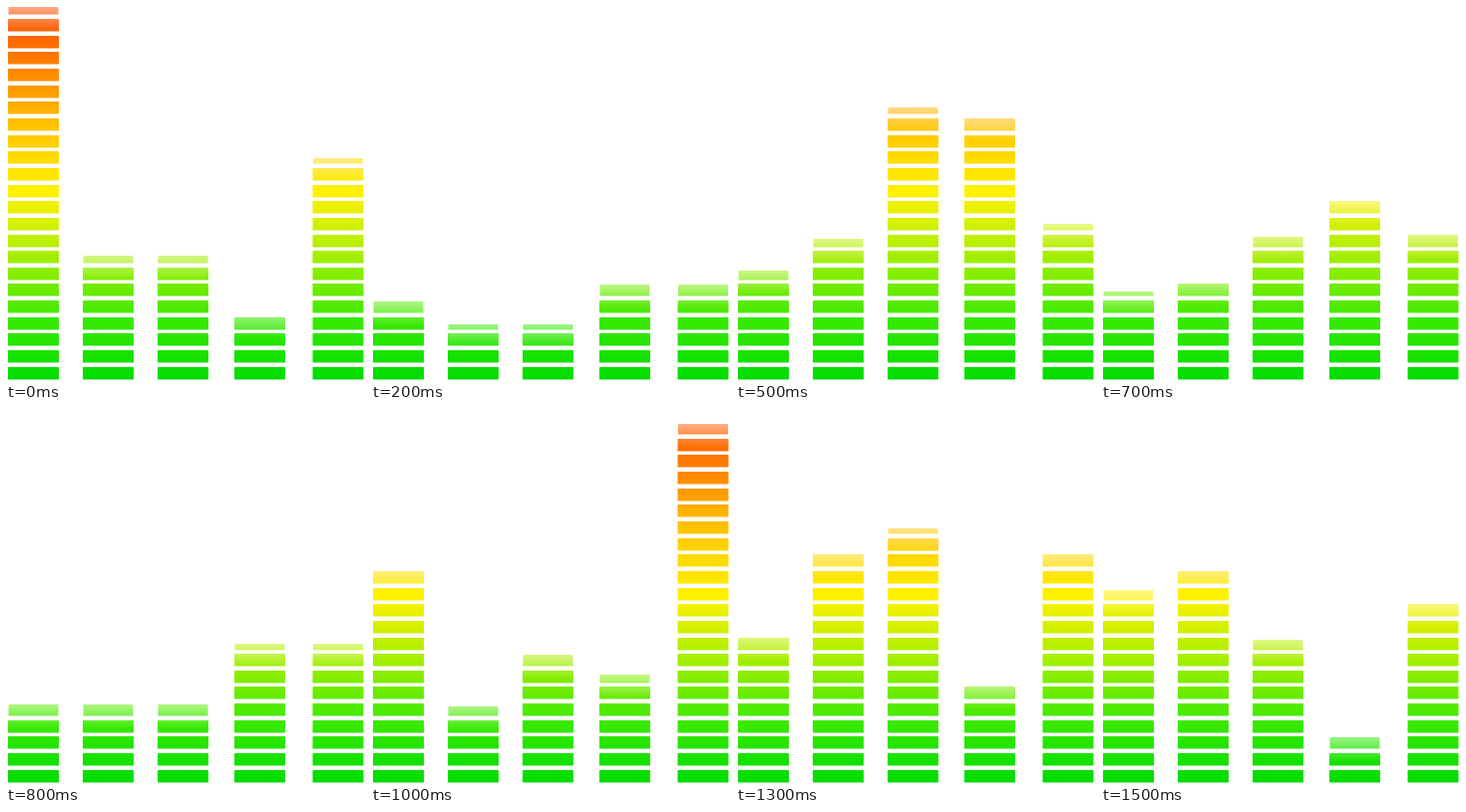
An HTML page with a canvas that plays this animation: 360 px wide and 377 px high, repeating every 1600 ms.

```html
<!DOCTYPE html>
<html lang="en">
<head>
<meta charset="utf-8">
<title>Equalizer</title>
<style>
  html, body { margin: 0; width: 100%; height: 100%; overflow: hidden; background: #fff; }
  canvas { display: block; }
</style>
</head>
<body>
<canvas id="stage" width="360" height="377"></canvas>
<script>
const W = 360, H = 377, STEP = 100, STEPS = 16;
const BAR_W = 51, SEG_H = 12.6, PITCH = 16.65, BASE = 362.7, FADE = 25;
const BARS = [2, 77, 152, 229, 307.5];

// Key poses: the top edge of each bar at a step
const POSES = [
  { step: 0, tops: [1, 251, 251, 309, 153] },
  { step: 2, tops: [297, 320, 320, 280, 280] },
  { step: 5, tops: [266, 234, 102, 112, 219] },
  { step: 8, tops: [297, 297, 297, 236, 236] },
  { step: 10, tops: [160, 299, 247, 267, 15] },
  { step: 12, tops: [251, 137, 64, 251, 120] },
  { step: 15, tops: [182, 160, 232, 330, 194] }
];

// Evenly spaced from the top of the stage to the bottom
const COLORS = ['#ff4800', '#ff8400', '#ffc800', '#fff200', '#a6ee00', '#3cea00', '#00dc00'];

const ctx = document.getElementById('stage').getContext('2d');

function gradient(y0, y1, colors) {
  const g = ctx.createLinearGradient(0, y0, 0, y1);
  colors.forEach((color, i) => g.addColorStop(i / (colors.length - 1), color));
  return g;
}

const ramp = gradient(0, H - 1, COLORS);

function topsAt(step) {
  const i = POSES.findLastIndex(pose => pose.step <= step);
  const a = POSES[i], b = POSES[i + 1] || a;
  const k = (step - a.step) / (b.step - a.step || 1);
  return a.tops.map((top, n) => Math.round(top + (b.tops[n] - top) * k));
}

function drawBar(x, top) {
  ctx.beginPath();
  for (let y = BASE; Math.round(y) + SEG_H > top; y -= PITCH) {
    const y0 = Math.max(Math.round(y), top);
    const inset = y0 === top ? 0.5 : 0;
    ctx.roundRect(x + inset, y0, BAR_W - inset * 2, Math.round(y) + SEG_H - y0, 0.7);
  }
  ctx.fillStyle = ramp;
  ctx.fill();

  // pale tip that fades out downwards
  ctx.fillStyle = gradient(top, top + FADE, ['rgba(255,255,255,.52)', 'rgba(255,255,255,0)']);
  ctx.fillRect(x - 1, top - 1, BAR_W + 2, FADE + 1);
}

const start = performance.now();
function loop() {
  const step = Math.floor((performance.now() - start) / STEP) % STEPS;
  ctx.clearRect(0, 0, W, H);
  topsAt(step).forEach((top, n) => drawBar(BARS[n], top));
  requestAnimationFrame(loop);
}
loop();
</script>
</body>
</html>
```
